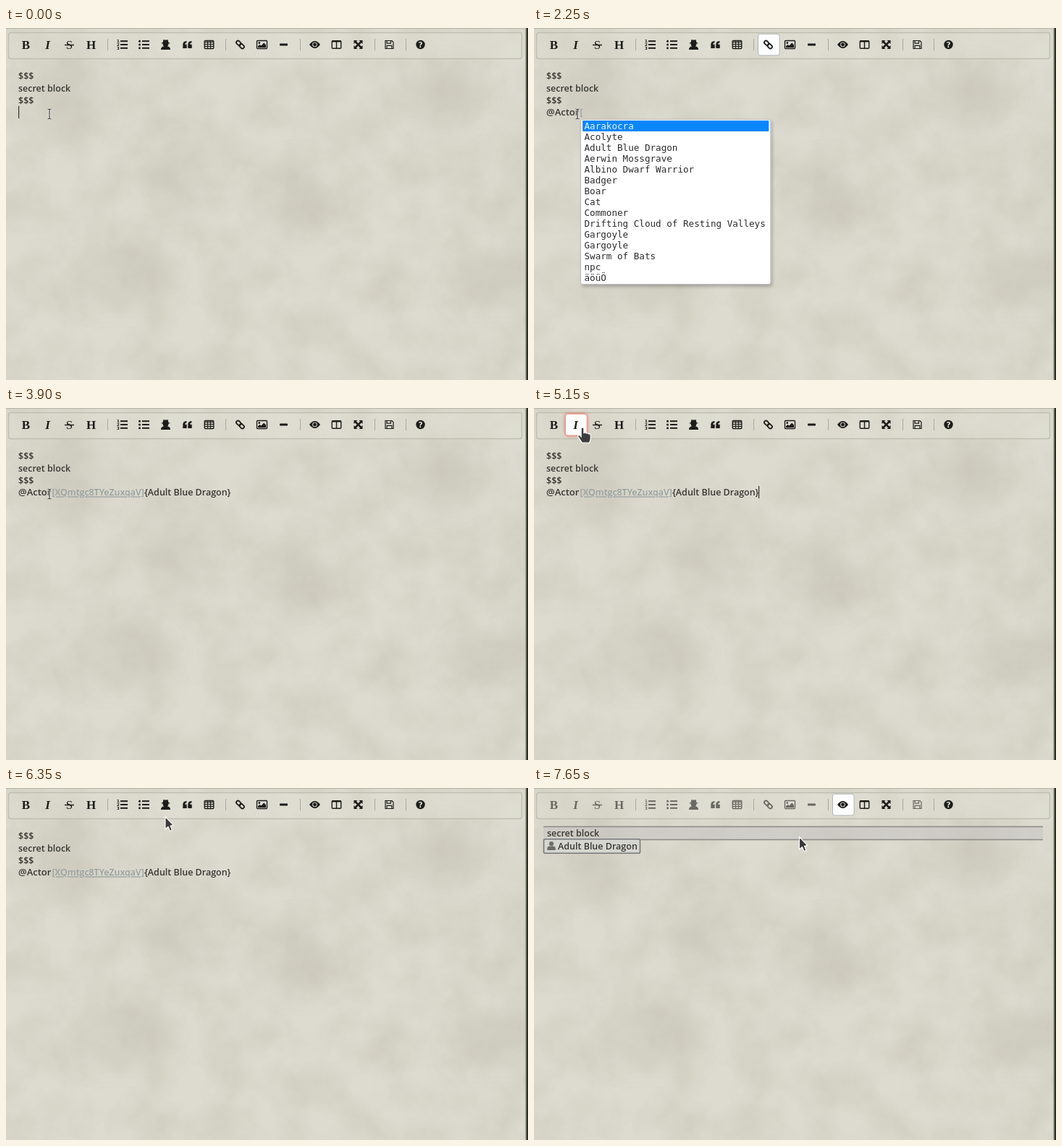
An HTML page for the animation above (8 s loop, 721 by 487 pixels).

```html
<!DOCTYPE html>
<html lang="en">
<head>
<meta charset="utf-8">
<title>Markdown editor</title>
<style>
  html, body { margin: 0; width: 100%; height: 100%; overflow: hidden; background: #dbd9ce; }
  svg { display: block; width: 721px; height: 487px; }
  text { white-space: pre; }
  .body { font: 600 12.5px "Open Sans", "Noto Sans", sans-serif; fill: #383733; }
  .mention { font-size: 13px; }
  .link { font-size: 12.4px; fill: #97a09f; text-decoration: underline; }
  .mono { font: 12.6px "DejaVu Sans Mono", monospace; fill: #2b2b2b; }
  .serif { font: bold 17px "Liberation Serif", serif; text-anchor: middle; fill: #1c1c1a; }
  .tiny { font: bold 5.5px "DejaVu Sans", sans-serif; }
  .ico { fill: #1c1c1a; stroke: none; }
  .ico .line { fill: none; stroke: #1c1c1a; stroke-width: 1.4; }
</style>
</head>
<body>
<svg viewBox="0 0 721 487" xmlns="http://www.w3.org/2000/svg">
  <defs>
    <filter id="paper" x="0" y="0" width="100%" height="100%" color-interpolation-filters="sRGB">
      <feTurbulence type="fractalNoise" baseFrequency=".018" numOctaves="6" seed="8"/>
      <feColorMatrix values="0 0 0 0 .7  0 0 0 0 .68  0 0 0 0 .6  .45 0 0 0 -.14"/>
    </filter>
    <filter id="soft" x="-60%" y="-60%" width="220%" height="220%"><feGaussianBlur stdDeviation="18"/></filter>
    <filter id="glow" x="-40%" y="-40%" width="180%" height="180%"><feGaussianBlur stdDeviation="2"/></filter>
    <filter id="shade" x="-10%" y="-10%" width="125%" height="125%">
      <feDropShadow dx="2" dy="3" stdDeviation="2.2" flood-color="#000" flood-opacity=".22"/>
    </filter>
  </defs>
  <rect width="721" height="487" fill="#dddbd0"/>
  <g id="stains" filter="url(#soft)" fill="#b5b2a1"></g>
  <rect width="721" height="487" filter="url(#paper)"/>
  <rect width="717" height="1.2" fill="#b9b8ac"/>
  <rect x="3.5" y="6.5" width="709" height="36" rx="3" fill="#e2e1d6" fill-opacity=".25" stroke="#bfbeb0" stroke-width="1.4"/>
  <rect x="717.2" width="1.4" height="487" fill="#a3a596"/>
  <rect x="718.6" width="2.4" height="487" fill="#2b3020"/>
  <g id="scene"></g>
</svg>
<script>
const LOOP = 8000, STEP = 50, STICKY = 150;
const PREVIEW = 7450, TYPED = 900, PICKED = 2250, DONE = 3900;
const scene = document.getElementById("scene");

// The paper texture repeats every 520 px
const TILE = 520;
document.getElementById("stains").innerHTML = [[85, 95, 50], [235, 205, 45], [400, 235, 45], [190, 340, 40], [130, 350, 30]]
  .map(([x, y, r]) => [x, x + TILE].map(cx => `<circle cx="${cx}" cy="${y}" r="${r}" opacity=".26"/>`).join("")).join("");

const letter = (c, style = "") => `<text class="serif" y="6" style="${style}">${c}</text>`;
const line = (d, w = 1.4) => `<path class="line" d="${d}" style="stroke-width:${w}"/>`;
const frame = (w, h) => `<rect class="line" x="${-w / 2}" y="${-h / 2}" width="${w}" height="${h}" rx="1"/>`;
const turned = (angles, s) => angles.map(a => `<g transform="rotate(${a})">${s}</g>`).join("");
const list = mark => [-1, 0, 1].map(i => line(`M-2.5 ${i * 4.8}h10`, 2) + mark(i * 4.8, i + 2)).join("");
const quote = x => `<path d="M${x} 5h5.4v-5.2h-2.6q0-2.4 2.4-2.6v-2.2q-5.2.2-5.2 5z"/>`;

const icons = {
  bold: letter("B"),
  italic: letter("I", "font-style:italic"),
  strike: letter("S", "font-weight:normal") + line("M-6.5.5h13"),
  heading: letter("H"),
  ol: list((y, n) => `<text class="tiny" x="-7.5" y="${y + 2}">${n}</text>`),
  ul: list(y => `<circle cx="-6" cy="${y}" r="1.5"/>`),
  secret: '<path d="M-3-7Q0-6 3-7L4-3Q6.5-2.4 6-1.4H4Q4 1.4 2.4 2.2Q6.5 2.6 6.5 7H-6.5Q-6.5 2.6-2.4 2.2Q-4 1.4-4-1.4H-6Q-6.5-2.4-4-3Z"/>',
  quote: quote(-6.2) + quote(.8),
  table: frame(12.5, 11) + line("M-6-3.6h12M-6-.6h12M-6 2.4h12M-2-5v10M2-5v10", 1.1),
  link: turned([45, 225], '<rect class="line" x="-.4" y="-2.4" width="7" height="4.8" rx="2.2" style="stroke-width:1.8"/>'),
  image: frame(14, 11) + '<circle cx="-3.7" cy="-2.3" r="1.4"/><path d="M-5.5 4V2L-3 0L-1 1.5L2.7-2.5L5.5.5V4Z"/>',
  rule: '<rect x="-5.5" y="-1.4" width="11" height="2.8" rx=".7"/>',
  eye: '<path d="M-7.5 0Q0-10 7.5 0Q0 10-7.5 0Z"/><circle r="3.3" fill="#e4e3da"/><circle r="2.4"/>',
  columns: frame(12.5, 10.5) + line("M-6-4.2h12M0-5v10"),
  expand: turned([0, 90, 180, 270], '<path d="M-6-6h5L-2.6-4.4L.8-1L-1 .8L-4.4-2.6L-6-1Z"/>'),
  save: line("M-5.5-5.5h9l2 2v9h-11ZM-3.4-5.3v3.4h5.4v-3.4M-3.4 5.3v-4h6.8v4", 1.2),
  help: '<circle r="6.2"/><text class="tiny" y="4" style="font-size:10.5px" text-anchor="middle" fill="#e0dfd4">?</text>'
};
const stays = ["eye", "columns", "expand", "help"];

// Lay out the toolbar: buttons 30 px apart, a divider between groups
const spots = {}, dividers = [];
let left = 27;
for (const group of ["bold italic strike heading", "ol ul secret quote table", "link image rule", "eye columns expand", "save", "help"]) {
  for (const name of group.split(" ")) {
    spots[name] = left;
    left += 30;
  }
  dividers.push(left - 7);
  left += 13;
}
dividers.pop();

const kinds = ["Actor", "Compendium", "Item", "Macro", "RollTable", "Scene"];
const actors = ["Aarakocra", "Acolyte", "Adult Blue Dragon", "Aerwin Mossgrave", "Albino Dwarf Warrior",
  "Badger", "Boar", "Cat", "Commoner", "Drifting Cloud of Resting Valleys", "Gargoyle", "Gargoyle",
  "Swarm of Bats", "npc", "äöüÖ"];

// Pointer moves: start, end, x, y
const moves = [[4850, 5150, 67, 27], [5150, 5400, 37, 27], [5550, 5750, 44, 84], [5750, 6350, 220, 39],
  [6400, 6550, 327, 24], [6750, 6950, 411, 24], [7100, 7150, 418, 24], [PREVIEW, 7650, 366.5, 67]];

const body = (s, x, y, cls = "") => `<text class="body ${cls}" x="${x}" y="${y}">${s}</text>`;

function pointerAt(t) {
  let x = 60, y = 119;
  for (const [from, to, nx, ny] of moves) {
    const k = Math.min(1, Math.max(0, (t - from) / (to - from)));
    const e = k * k * (3 - 2 * k);
    x += (nx - x) * e;
    y += (ny - y) * e;
  }
  return [x, y];
}

function under(t) {
  const [x, y] = pointerAt(t);
  return y < 38.5 && Object.keys(spots).find(name => Math.abs(x - spots[name] - 1.5) < 15);
}

// The highlight lingers a little after the pointer has left
const hovered = t => under(t) || under(t - STICKY);

function button(name, hot) {
  const box = `x="${spots[name] - 13.5}" y="8.3" width="29.6" height="29.6" rx="3"`;
  const glow = hot ? `<rect ${box} fill="#ff1a10" opacity=".75" filter="url(#glow)"/>` : "";
  return `${glow}<rect ${box} fill="#fdfdfd" stroke="${hot ? "#e39b94" : "#aeb5b5"}"/>`;
}

function toolbar(t, preview) {
  const hot = hovered(t);
  let s = "";
  if (t >= PICKED && t < DONE) s += button("link");
  if (preview) s += button("eye");
  if (hot) s += button(hot, true);
  s += dividers.map(x => `<rect x="${x}" y="15" width="1" height="16" fill="#a9a99d"/>`).join("");
  return s + Object.keys(icons).map(name =>
    `<g class="ico" transform="translate(${spots[name] + .5} 23)" opacity="${preview && !stays.includes(name) ? .6 : 1}">${icons[name]}</g>`).join("");
}

function popup(items, x, pick) {
  const w = Math.max(...items.map(s => s.length)) * 7.585 + 12;
  return `<rect x="${x}" y="126.5" width="${w}" height="${items.length * 15 + 3}" rx="2.5" fill="#fff" stroke="#bcbcbc" filter="url(#shade)"/>` +
    `<rect x="${x + 2.5}" y="${128 + pick * 15}" width="${w - 5}" height="15" rx="1" fill="#0a86fb"/>` +
    items.map((s, i) => `<text class="mono" x="${x + 5}" y="${140 + i * 15}"${i === pick ? ' style="fill:#e8f4ff"' : ""}>${s}</text>`).join("");
}

function caretOn(t) {
  if (t < PICKED) return t < 400 || t >= TYPED;
  if (t < DONE) return t >= 2500;
  return t >= 4500 && (t - 4500) % 1150 < 700;
}

function editor(t) {
  const typed = t >= TYPED, picked = t >= PICKED, done = t >= DONE;
  let s = ["$$$", "secret block", "$$$"].map((row, i) => body(row, 17, 70.5 + i * 17)).join("");
  if (typed) s += body(picked ? "@Actor" : "@", 17, 121.3, "mention");
  if (picked) s += body(done ? "[XQmtgc8TYeZuxqaV]" : "[", 63.5, 121.3, "link");
  if (done) s += body("{Adult Blue Dragon}", 191, 121.3);
  if (caretOn(t)) {
    const x = done ? 310 : picked ? 67 : typed ? 31 : 17;
    s += `<rect x="${x}" y="108" width="1.2" height="17" fill="#33332f"/>`;
  }
  if (typed && !picked) s += popup(kinds, 31.5, 0);
  if (picked && !done) {
    const down = [2900, 3150, 3300].filter(k => t >= k).length;
    s += popup(actors, 64.5, t < 3450 ? down : 2);
  }
  return s;
}

function rendered() {
  return '<rect x="13" y="53" width="690" height="19" fill="#c4c2c2" opacity=".5"/>' +
    '<path d="M13 53.5H703M13 71.5H703" stroke="#898986" stroke-width="1.3"/>' +
    body("secret block", 18, 67) +
    '<rect x="13.5" y="70.7" width="133" height="19.6" rx="2" fill="#d6d6d0" stroke="#777a7b" stroke-width="1.6"/>' +
    '<g fill="#6c6c68"><circle cx="24" cy="77" r="3.1"/><path d="M18.3 86V83.5Q18.5 80.8 21.5 80.6H26.5Q29.5 80.8 29.7 83.5V86Z"/></g>' +
    body("Adult Blue Dragon", 33, 85);
}

function pointer(t, preview) {
  const [x, y] = pointerAt(t);
  let art;
  if (y < 38.5) {
    art = '<path transform="scale(1.06)" d="M-1.8 1Q0-1.3 1.8 1V7Q3.6 5.8 4.8 7.5Q6.6 6.5 7.6 8.3Q10.4 7.6 10.6 10.5V15L9 20H-.5L-6 12Q-6.5 9.8-4 10L-1.8 12Z" fill="#3c3c3c" stroke="#fff" stroke-width="1.2"/>';
  } else if (preview || y < 45) {
    art = '<path d="M0 .5V18L4 14.5L6.5 20.5L9.4 19.2L7 13.3L11.3 12.6Z" fill="#3a3a3a" stroke="#fff" stroke-width="1.1" stroke-linejoin="round"/>';
  } else {
    const d = "M-2.5-6.7H-1L0-6V6L-1 6.7H-2.5M2.5-6.7H1L0-6M0 6L1 6.7H2.5";
    art = `<g fill="none"><path d="${d}" stroke="#fff" stroke-width="2.8" opacity=".7"/><path d="${d}" stroke="#30302e" stroke-width="1.1"/></g>`;
  }
  return `<g transform="translate(${x} ${y})">${art}</g>`;
}

let last = -1;
function draw(now) {
  const t = Math.floor((now % LOOP) / STEP) * STEP;
  if (t !== last) {
    const preview = t >= PREVIEW;
    scene.innerHTML = toolbar(t, preview) + (preview ? rendered() : editor(t)) + pointer(t, preview);
    last = t;
  }
  requestAnimationFrame(draw);
}
draw(performance.now());
</script>
</body>
</html>
```
